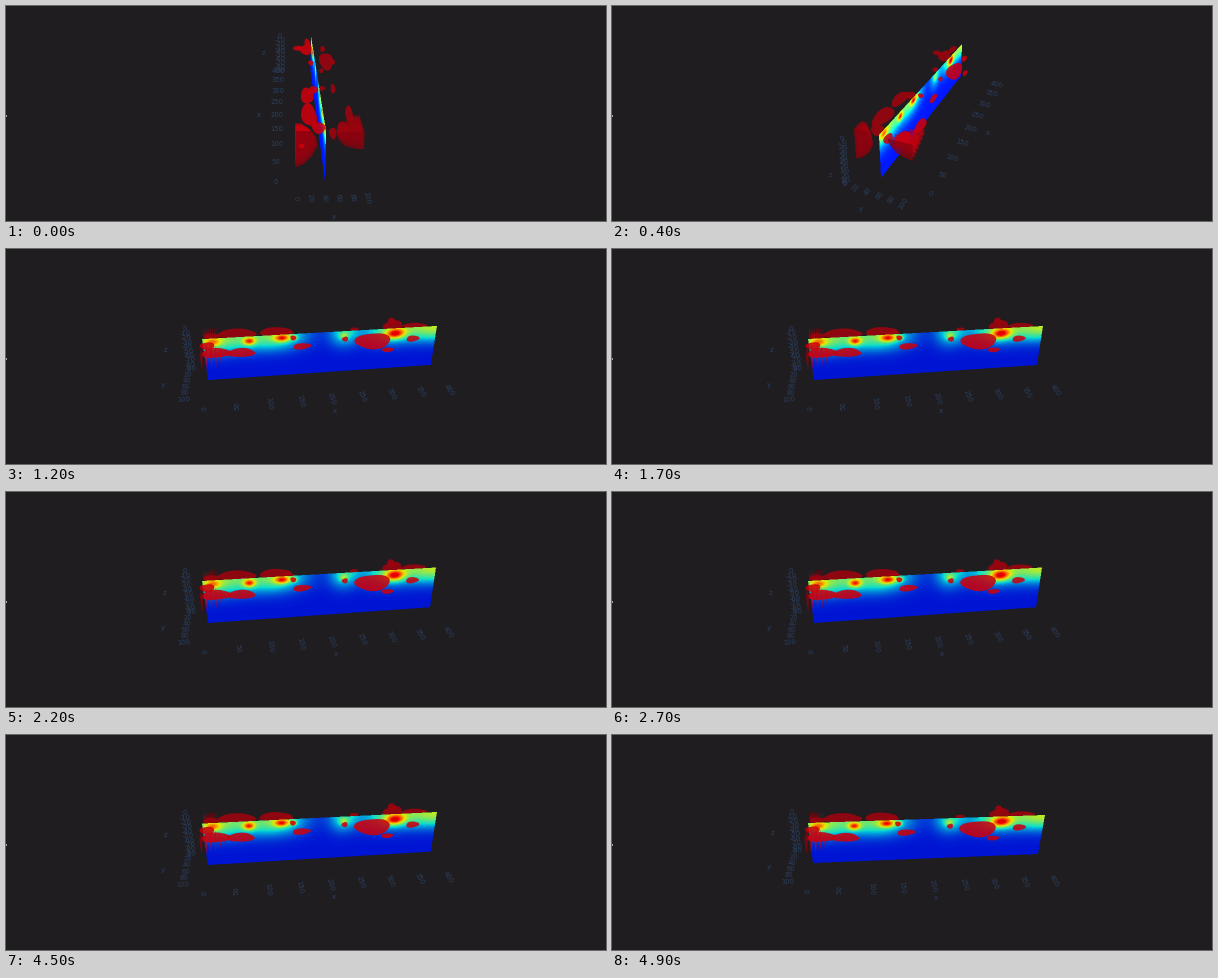
Write a matplotlib script that moves like this. It is 600 px wide and 215 px high and loops after 5 s.

```python
import numpy as np
import matplotlib.pyplot as plt
from matplotlib.animation import FuncAnimation
from matplotlib.patches import Polygon, Rectangle

W, H, STEP, FRAMES = 600, 215, 100, 50
BG, INK = "#1f1d20", "#2a3f5f"
RED, DARK, BACK = (0.80, 0.0, 0.05), (0.53, 0.01, 0.06), (0.62, 0.01, 0.05)
PLANE_Y = 44

# Camera poses: screen points of the section's near-top, far-top and
# near-bottom corners, perspective weights g and h, homogeneous y axis.
POSES = np.array([
    [320, 125, 305, 30, 319, 176, .54, .02, 69, 0, 0],
    [267, 129, 350, 38, 269, 172, .48, .044, 45.9, 11, -.047],
    [202, 104, 418, 63, 208, 146, .253, .066, -10.3, 18.5, -.115],
    [196, 90, 431, 77, 202, 131, .073, .056, -26, 17.3, -.112],
    [196, 89, 430, 75.5, 202, 131, .08, .056, -25.5, 17.3, -.112],
    [196, 88, 433, 80, 201, 128, .038, .0545, -27.3, 18, -.108],
])
TIMES = [0, 400, 600, 800, 1200, 1700, 2200, 4150, 4900]
STAGES = [0, 1, 1.78, 2, 2.95, 3, 4, 4, 5]


def tangents(keys):
    d = np.diff(keys, axis=0)
    a, b = d[:-1], d[1:]
    same = a * b > 0
    inner = np.where(same, 2 * a * b / np.where(same, a + b, 1), 0)
    return np.vstack([d[:1], inner, d[-1:]])


SLOPES = tangents(POSES)


def camera(k):
    """3x4 projection for inputs (s, u, v, 1) at stage k."""
    i = min(int(k), len(POSES) - 2)
    f = k - i
    p = ((2 * f**3 - 3 * f**2 + 1) * POSES[i] + (f**3 - 2 * f**2 + f) * SLOPES[i]
         + (3 * f**2 - 2 * f**3) * POSES[i + 1] + (f**3 - f**2) * SLOPES[i + 1])
    near = np.array([p[0], p[1], 1])
    far = (1 + p[6]) * np.array([p[2], p[3], 1])
    low = (1 + p[7]) * np.array([p[4], p[5], 1])
    return np.column_stack([far - near, p[8:11], low - near, near])


def project(cam, pts):
    x, y, d = np.asarray(pts, float).T
    q = cam @ np.array([x / 400, (y - PLANE_Y) / 100, d / 90, np.ones_like(x)])
    return (q[:2] / q[2]).T, q[2]


# --- section texture -------------------------------------------------------
def bump(v, c, w):
    return np.exp(-((v - c) / w) ** 2)


X, D = np.meshgrid(np.linspace(0, 400, 800), np.linspace(0, 90, 180))
top = (.38 * bump(X, 25, 60) + .33 * bump(X, 120, 48) + .24 * bump(X, 235, 24)
       + .36 * bump(X, 325, 55) + .40 * bump(X, 405, 45))
field = .15 + top * np.exp(-(D / 30) ** 2)
for cx, cd, wx, wd, amp in [(15, 8, 14, 9, .3), (75, 10, 10, 8, .45),
                            (130, 7, 13, 8, .45), (150, 8, 5, 5, .25),
                            (235, 10, 7, 7, .2), (325, 12, 17, 11, .5)]:
    field += amp * bump(X, cx, wx) * bump(D, cd, wd)
field = np.clip(field, 0, .91)
TEX = plt.get_cmap("jet")(field)[..., :3]

SS = 2
gy, gx = np.mgrid[0:H * SS, 0:W * SS]
GRID = np.array([(gx.ravel() + .5) / SS, (gy.ravel() + .5) / SS, np.ones(gx.size)])


def section(cam, shade):
    hom = cam[:, [0, 2, 3]]
    with np.errstate(all="ignore"):
        q = np.linalg.inv(hom) @ GRID
        s, v = np.nan_to_num(q[0] / q[2]), np.nan_to_num(q[1] / q[2])
    inside = (s >= 0) & (s <= 1) & (v >= 0) & (v <= 1) & (q[2] > 0)
    col = (np.clip(s, 0, 1) * 799).astype(int)
    row = (np.clip(v, 0, 1) * 179).astype(int)
    tex = TEX * (1 - shade * (1 - field))[..., None]
    rgba = np.zeros((GRID.shape[1], 4))
    rgba[inside, :3] = tex[row[inside], col[inside]]
    rgba[:, 3] = inside
    out = rgba.reshape(H, SS, W, SS, 4).mean(axis=(1, 3))
    out[..., :3] /= np.maximum(out[..., 3:], 1e-6)
    return np.clip(out, 0, 1)


# --- red bodies: x, y, depth, radii ---------------------------------------
BLOBS = [
    (55, 22, 5, 32, 12, 8), (120, 22, 5, 26, 10, 8), (140, 34, 4, 10, 8, 5),
    (14, 34, 3, 12, 10, 7), (8, 55, 9, 11, 5, 8), (0, 9, 26, 1, 4, 4),
    (62, 86, 8, 22, 6, 8), (22, 72, 14, 22, 9, 9), (160, 70, 12, 15, 4, 6),
    (148, 50, 5, 5, 5, 4), (280, 68, 11, 29, 13, 16), (325, 30, 3, 17, 12, 11),
    (328, 13, 1, 7, 11, 5), (362, 34, 2, 22, 6, 5), (350, 66, 12, 11, 5, 6),
    (302, 84, 22, 11, 4, 4), (255, 36, 3, 7, 5, 5), (235, 55, 11, 5, 4, 5),
]
# Bodies cut open at x = 0: face outline (y, depth), fixed y, length
BLOCKS = [
    ([(0, 0), (22, 0), (30, 12), (32, 26), (24, 44), (12, 58), (0, 64)], 0, 22),
    ([(100, 0), (58, 2), (62, 14), (72, 26), (85, 30), (100, 32)], 100, 45),
]
ANGLE = np.linspace(0, 2 * np.pi, 48, endpoint=False)


def blob_outline(cam, n, blob):
    c, r = np.array(blob[:3], float), np.array(blob[3:], float)
    pts, w = project(cam, np.vstack([c, c + np.diag(r), c - np.diag(r)]))
    a = ((pts[1:4] - pts[4:]) / 2).T
    low = np.linalg.cholesky(a @ a.T + .02 * np.eye(2))
    rad = 1 + .07 * np.sin(3 * ANGLE + n) + .05 * np.sin(2 * ANGLE + 2 * n)
    ring = np.array([rad * np.cos(ANGLE), rad * np.sin(ANGLE)])
    return pts[0] + (low @ ring).T, w[0]


def block_slice(cam, face, anchor, x, scale):
    pts = [(x, anchor + (y - anchor) * scale, d * scale) for y, d in face]
    out, w = project(cam, pts)
    return out, w.mean()


# --- stage ------------------------------------------------------------------
fig = plt.figure(figsize=(W / 100, H / 100), dpi=100, facecolor=BG)
ax = fig.add_axes([0, 0, 1, 1])
image = ax.imshow(np.zeros((H, W, 4)), extent=(0, W, H, 0), zorder=3,
                  interpolation="nearest", aspect="auto")
ax.set(xlim=(0, W), ylim=(H, 0))
ax.axis("off")
ax.add_patch(Rectangle((0, 108.5), 1, 2, color="#a8a8a8", lw=0))


def body(alpha):
    return ax.add_patch(Polygon([(0, 0), (1, 0), (0, 1)], lw=0, alpha=alpha))


bodies = []  # patch, y, outline function, is cut face
for n, b in enumerate(BLOBS):
    bodies.append((body(.88), b[1],
                   lambda cam, n=n, b=b: blob_outline(cam, n, b), False))
for face, anchor, length in BLOCKS:
    for f in np.linspace(1, 0, 7):
        bodies.append((body(.8 if f == 0 else .6), anchor,
                       lambda cam, q=(face, anchor, f * length, 1 - .6 * f**1.5):
                       block_slice(cam, *q), f == 0))


def text(s, size=4.9):
    return ax.text(0, 0, s, color=INK, size=size, ha="center", va="center",
                   family="DejaVu Sans", zorder=0.5)


x_ticks = [(v, text(str(v))) for v in range(0, 401, 50)]
y_ticks = [(v, text(str(v))) for v in range(0, 101, 20)]
z_ticks = [(v, text(str(-v))) for v in range(0, 91, 10)]
titles = [text(c, 5.2) for c in "xyz"]


def place(cam, label, pos, along=None):
    pos = np.array(pos, float)
    pts, _ = project(cam, [pos] if along is None else [pos, pos + along])
    label.set_position(pts[0])
    if along is not None:
        dx, dy = pts[1] - pts[0]
        turn = np.degrees(np.arctan2(-dy, dx))
        label.set_rotation((turn + 90) % 180 - 90)


def draw_axes(cam, k):
    early = k < .4
    side, sign = (0, -1) if early else (100, 1)
    ex, ey = np.array([10, 0, 0]), np.array([0, 10, 0])
    for v, lab in x_ticks:
        place(cam, lab, (v, side + sign * 29, 90), ey)
    for v, lab in y_ticks:
        place(cam, lab, (-36, v, 90), ex)
    for v, lab in z_ticks:
        if early:
            place(cam, lab, (400, -25, v), ey)
        else:
            place(cam, lab, (-32, 0, v), ex)
    place(cam, titles[0], (200, side + sign * 64, 90))
    place(cam, titles[1], (-74, 50, 90))
    place(cam, titles[2], (400, -62, 45) if early else (-70, 0, 45))


def draw(i):
    k = float(np.interp(i * STEP, TIMES, STAGES))
    cam = camera(k)
    image.set_data(section(cam, .2 * np.clip(k - 2, 0, 1)))
    facing = np.linalg.det(cam[:, [0, 2, 3]]) > 0
    for patch, y, outline, cut in bodies:
        pts, w = outline(cam)
        front = (y > PLANE_Y) == facing
        patch.set_xy(pts)
        patch.set_facecolor(DARK if cut else RED if front else BACK)
        patch.set_zorder((5 if front else 2.5) - .5 * w)
    draw_axes(cam, k)
    return []


anim = FuncAnimation(fig, draw, frames=FRAMES, init_func=lambda: draw(0),
                     interval=STEP, repeat=True, repeat_delay=0, blit=False)
plt.show()
```
